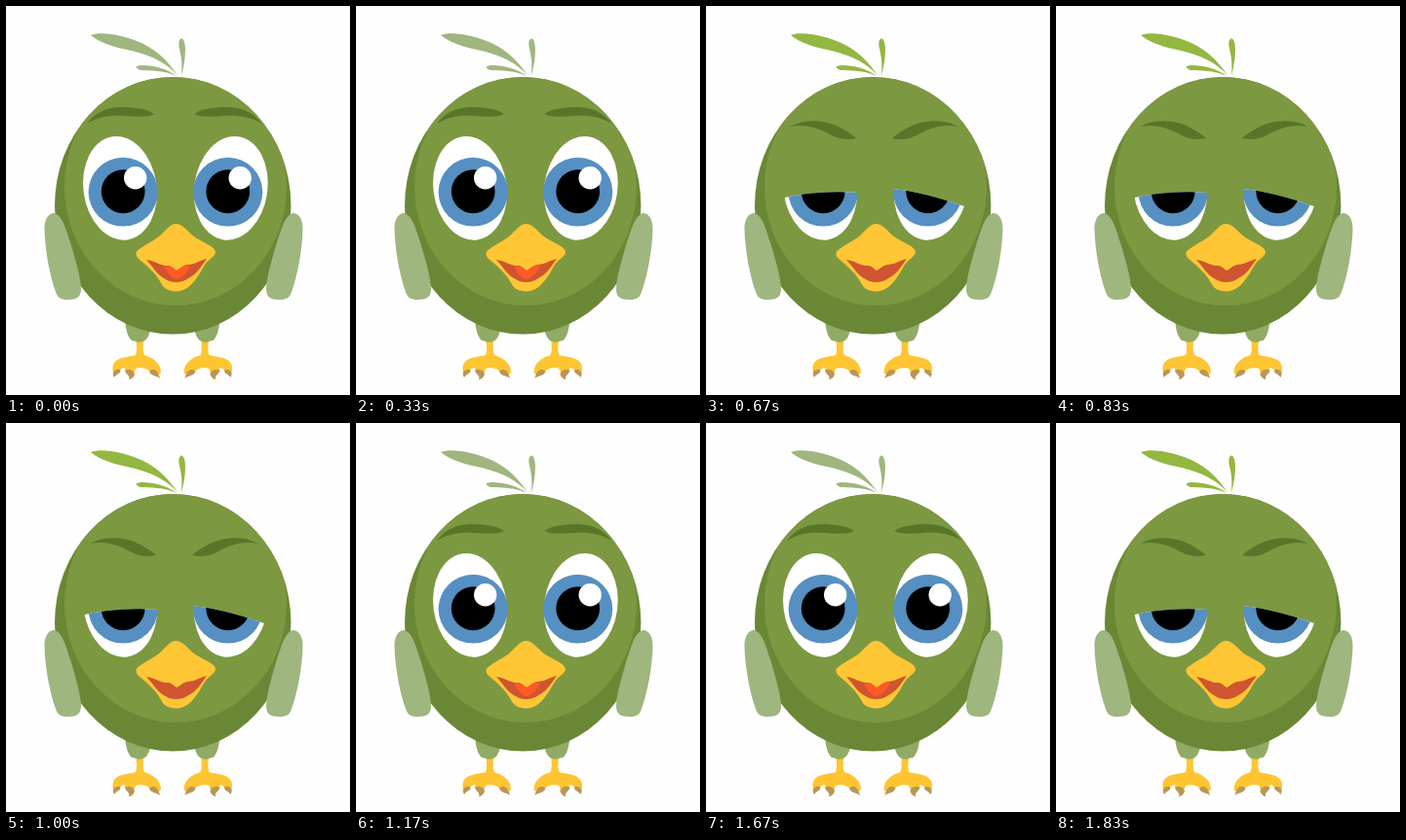
Write an HTML page with a canvas that moves like this. It is 353 px wide and 400 px high and loops after 2 s.

```html
<!DOCTYPE html>
<html lang="en">
<head>
<meta charset="utf-8">
<title>Blinking bird</title>
<style>
html, body { margin: 0; width: 100%; height: 100%; overflow: hidden; background: #fefefe; }
canvas { display: block; width: 353px; height: 400px; }
</style>
</head>
<body>
<canvas id="stage"></canvas>
<script>
const W = 353, H = 400, LOOP = 2000;
const canvas = document.getElementById('stage');
const ratio = window.devicePixelRatio || 1;
canvas.width = W * ratio;
canvas.height = H * ratio;
const ctx = canvas.getContext('2d');
ctx.scale(ratio, ratio);

const color = {
  body: '#7c9840', shade: '#6a8735', brow: '#587529', wing: '#9fb67f',
  fresh: '#93b740', blue: '#568fc1', beak: '#fec634', mouth: '#ce552f',
  tongue: '#ff5a25', foot: '#fec532', claw: '#b99655', thigh: '#90ab66'
};

function fill(d, c) {
  ctx.fillStyle = c;
  ctx.fill(new Path2D(d));
}

function oval(x, y, rx, ry, c, tilt = 0) {
  ctx.fillStyle = c;
  ctx.beginPath();
  ctx.ellipse(x, y, rx, ry, tilt, 0, Math.PI * 2);
  ctx.fill();
}

// Draws a part, then its reflection about a vertical axis.
function both(axis, draw) {
  draw();
  ctx.save();
  ctx.translate(axis * 2, 0);
  ctx.scale(-1, 1);
  draw();
  ctx.restore();
}

function leg() {
  fill('M132.5 340 L142 340 C140.5 348 140 354 142 359 C149 361 159 366 159 377 C157 380 151 380 148 376 C144 372 137 371 133 373 C132 377 130 379 126 379 C123 378 122 375 122 372 C118 372 117 376 113 378 C109 378 109 373 110 369 C113 361 125 361 133 359 C135 354 134 347 132.5 340Z', color.foot);
  fill('M111 382 C108 377 111 373 117 374 C119 378 113 378 111 382Z', color.claw);
  fill('M122 375 C126 372 132 375 132 379 C131 382 128 384 126 384 C128 380 123 379 122 375Z', color.claw);
  fill('M147 376 C150 372 156 373 158 383 C155 380 149 381 147 376Z', color.claw);
  fill('M122 322 L149 322 C149 334 146 344 140 345 C136 347 132 344 129 344 C125 340 123 334 122 322Z', color.thigh);
}

function feathers(c) {
  fill('M87 30 C98 25 124 31 140 38.5 C157 47 167 58 176 71 C166 60 150 51 131 46.5 C110 42 96 38 87 30Z', c);
  fill('M134 62 C139 59 164 62 175 72 C162 66 148 66.5 138 66 C135 65 133 63 134 62Z', c);
  fill('M179 34 C182 32 184 38 184 45 C184 55 182 64 180 72 C181 59 180 52 178 44 C177 39 177 36 179 34Z', c);
}

function torso() {
  ctx.save();
  ctx.beginPath();
  ctx.ellipse(171.2, 205.2, 121.2, 132.3, 0, 0, Math.PI * 2);
  ctx.fillStyle = color.shade;
  ctx.fill();
  ctx.clip();
  oval(174, 186, 114, 122, color.body);
  ctx.restore();
}

function wing() {
  fill('M50 213 C59 217 62 232 66 243 C71 260 77 280 77 291 C77 299 73 302 63 302 C56 302 53 300 51 294 C45 278 40 251 39.5 230 C39 221 43 212 50 213Z', color.wing);
}

function iris(x, open) {
  oval(x, 191.2, 35.6, 35.4, color.blue);
  oval(x, 190.7, 22.4, 22.5, '#000');
  if (open) oval(x + 12.5, 176.7, 11.7, 11.7, '#fff');
}

function eyes(open) {
  ctx.save();
  if (!open) {
    ctx.clip(new Path2D('M76 198 Q112 189 156.5 192 L156.5 245 L76 245Z M188 187 L191.5 188 Q222 191 265 206 L265 245 L188 245Z'));
  }
  both(173.9, () => oval(117, 187.3, 37.6, 53.6, '#fff', -0.14));
  iris(120.2, open);
  iris(227.7, open);
  ctx.restore();
}

function brows(open) {
  if (open) {
    both(172.7, () => fill('M83 121 C92 109 104 104 119 104 C133 104 145 106 152 111 C146 114.5 134 114 122 113 C106 112 94 114 83 121Z', color.brow));
  } else {
    both(172.5, () => fill('M86 124 C99 117 116 117 128 121 C140 125 148 131 154 136 C146 138 136 137 129 133 C114 125 103 121 86 124Z', color.brow));
  }
}

function beak(open) {
  fill('M174.5 224 C181 224 186 231 191.5 236 C199 242 215 247 215 253 C215 257 209 260 205.5 264 C201 270 200 274 196 279 C191 286 185 293.5 174 293.5 C163 293 161 288 158 283 C154 276 147 269 138 261.5 C135 259 133 257 133.5 254 C134 250 149 243 157 237 C163 232 168 224 174.5 224Z', color.beak);
  fill('M144 261 C153 262 160 268 167 267 C171 268 173 271 175 272 C178 271 181 267 186 266 C193 266 198 262 206 260 C200 268 196 276 187 280 C181 285 169 285 164 281 C155 277 151 268 144 261Z', color.mouth);
  if (open) {
    fill('M162 268 C169 266 172 271 175 272 C178 271 181 266 189 267 C186 274 181 280 175 281 C169 280 166 274 162 268Z', color.tongue);
  }
}

function draw(t) {
  const open = t < 670 || (t >= 1170 && t < 1830);
  ctx.fillStyle = '#fefefe';
  ctx.fillRect(0, 0, W, H);
  both(170.75, leg);
  feathers(open ? color.wing : color.fresh);
  torso();
  both(172, wing);
  eyes(open);
  brows(open);
  beak(open);
}

const start = performance.now();
function tick() {
  draw((performance.now() - start) % LOOP);
  requestAnimationFrame(tick);
}
tick();
</script>
</body>
</html>
```
